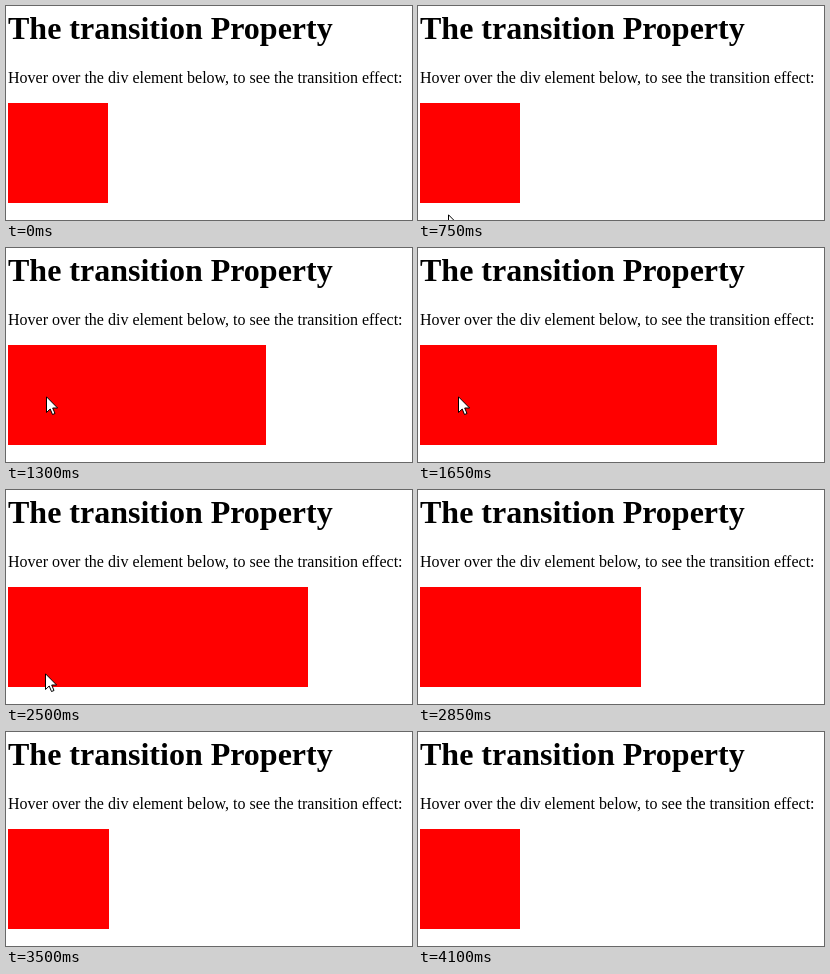
These frames come from a looping animation (406 px wide and 214 px high, 4150 ms). An HTML page:

```html
<!DOCTYPE html>
<html lang="en">
<head>
<meta charset="utf-8">
<title>The transition Property</title>
<style>
  html, body { margin: 0; width: 100%; height: 100%; overflow: hidden; background: #fff; }
  body { position: relative; font-family: "Liberation Serif", "Times New Roman", serif; color: #000; }
  h1, p, #box, #cursor { position: absolute; margin: 0; left: 2px; white-space: nowrap; }
  h1 { top: 4px; font-size: 32px; }
  p { top: 63px; font-size: 16px; }
  #box { top: 97px; width: 100px; height: 100px; background: #f00; }
  #cursor { left: 0; top: 0; }
</style>
</head>
<body>
<h1>The transition Property</h1>
<p>Hover over the div element below, to see the transition effect:</p>
<div id="box"></div>
<svg id="cursor" width="13" height="20">
  <path d="M.5 .8V16.5L4.2 13 6.5 18.5 9 17.5 6.7 12H11.6Z" fill="#fff" stroke="#000"/>
</svg>
<script>
const LOOP = 4150, STEP = 50, DURATION = 1000;
const HOVER = 814, LEAVE = 2607;
// Pointer stops: time, x, y
const stops = [
  [0, 27, 220], [690, 27, 220], [750, 30, 208], [HOVER, 33, 197], [1050, 40, 148],
  [2100, 40, 148], [2500, 39, 183], [LEAVE, 40, 197], [2750, 40, 220], [LOOP, 40, 220]
];
const box = document.getElementById('box');
const cursor = document.getElementById('cursor');

// CSS "ease": cubic-bezier(.25, .1, .25, 1)
function ease(x) {
  if (x <= 0) return 0;
  if (x >= 1) return 1;
  let lo = 0, hi = 1, s;
  for (let i = 0; i < 24; i++) {
    s = (lo + hi) / 2;
    if (0.75 * s * (1 - s) + s ** 3 < x) lo = s; else hi = s;
  }
  return 0.3 * s * (1 - s) ** 2 + 3 * s * s * (1 - s) + s ** 3;
}

function pointerAt(t) {
  const i = stops.findIndex(stop => stop[0] > t);
  const [t0, x0, y0] = stops[i - 1], [t1, x1, y1] = stops[i];
  const k = (t - t0) / (t1 - t0);
  return [x0 + (x1 - x0) * k, y0 + (y1 - y0) * k].map(Math.round);
}

function draw() {
  const t = Math.floor(performance.now() % LOOP / STEP) * STEP;
  const grown = ease((t - HOVER) / DURATION) - ease((t - LEAVE) / DURATION);
  box.style.width = Math.round(100 + 200 * grown) + 'px';
  const [x, y] = pointerAt(t);
  cursor.style.transform = `translate(${x}px, ${y}px)`;
  requestAnimationFrame(draw);
}
draw();
</script>
</body>
</html>
```
